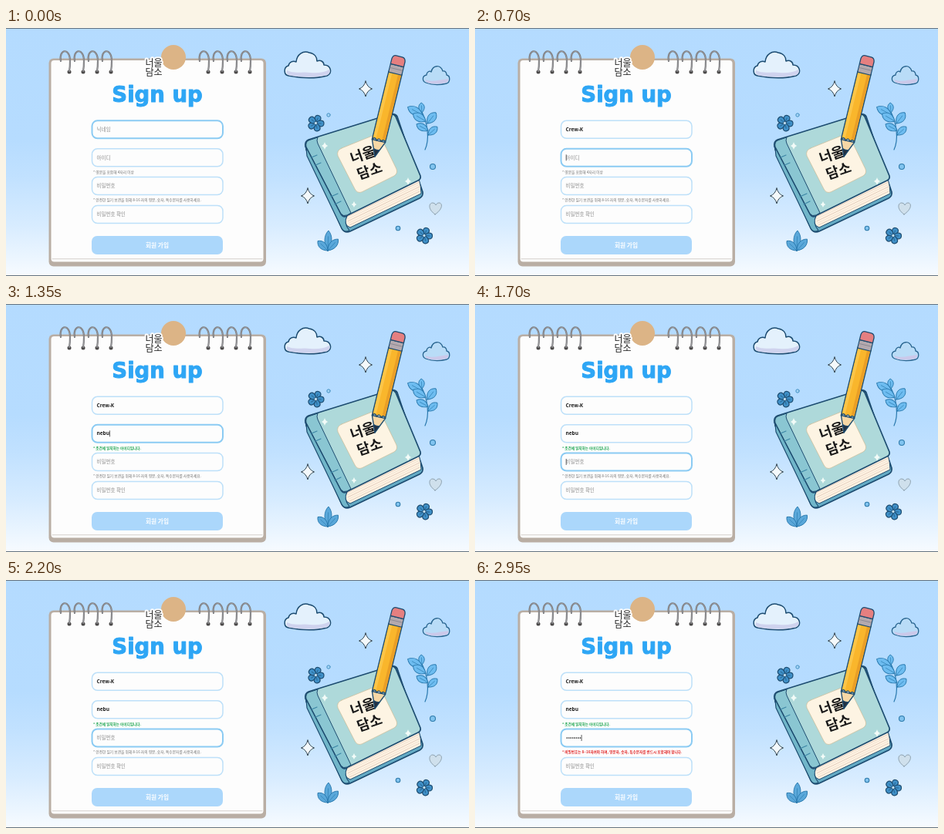
An HTML page with a canvas for the animation above (3 s loop, 600x322 px).

```html
<!DOCTYPE html>
<html lang="ko">
<head>
<meta charset="utf-8">
<title>Sign up</title>
<style>
html, body { margin: 0; width: 100%; height: 100%; overflow: hidden; background: #b6dcff; }
canvas { display: block; width: 600px; height: 322px; }
</style>
</head>
<body>
<canvas id="stage"></canvas>
<script>
const W = 600, H = 322, LOOP = 3000;
const KR = '"Noto Sans CJK KR", "Noto Sans", sans-serif';
const LATIN = '"Noto Sans", "Open Sans", sans-serif';
const INK = '#1d4c70';
const canvas = document.getElementById('stage');
const dpr = window.devicePixelRatio || 1;

function makeLayer(c) {
  c.width = W * dpr;
  c.height = H * dpr;
  const g = c.getContext('2d');
  g.scale(dpr, dpr);
  g.lineJoin = g.lineCap = 'round';
  g.textBaseline = 'middle';
  return g;
}
const screen = makeLayer(canvas);
const backdrop = document.createElement('canvas');
let g = makeLayer(backdrop);

// ---- helpers
function paint(path, fill, stroke, width = 1) {
  if (fill) { g.fillStyle = fill; g.fill(path); }
  if (stroke) { g.strokeStyle = stroke; g.lineWidth = width; g.stroke(path); }
}
const shape = (d, fill, stroke, width) => paint(new Path2D(d), fill, stroke, width);

function box(x, y, w, h, r, fill, stroke, width) {
  const p = new Path2D();
  p.roundRect(x, y, w, h, r);
  paint(p, fill, stroke, width);
}
function dot(x, y, r, fill, stroke, width) {
  const p = new Path2D();
  p.arc(x, y, r, 0, Math.PI * 2);
  paint(p, fill, stroke, width);
}
function label(s, x, y, size, color, weight = 400, family = KR, align = 'left') {
  g.font = `${weight} ${size}px ${family}`;
  g.textAlign = align;
  g.fillStyle = color;
  g.fillText(s, x, y);
  return g.measureText(s).width;
}
function at(x, y, deg, draw) {
  g.save();
  g.translate(x, y);
  g.rotate(deg * Math.PI / 180);
  draw();
  g.restore();
}

// ---- illustration
function sparkle(x, y, r, fill, stroke) {
  const k = r * 0.2;
  at(x, y, 0, () => shape(
    `M0 ${-r}Q${k} ${-k} ${r * .85} 0Q${k} ${k} 0 ${r}Q${-k} ${k} ${-r * .85} 0Q${-k} ${-k} 0 ${-r}Z`,
    fill, stroke, 1));
}
function flower(x, y, r) {
  for (let i = 0; i < 5; i++) {
    at(x, y, i * 72 + 22, () => {
      shape(`M0 0C${-r * .5} ${-r * .35} ${-r * .5} ${-r} 0 ${-r}C${r * .5} ${-r} ${r * .5} ${-r * .35} 0 0Z`, '#3f90c8', INK, 1.2);
      shape(`M0 ${-r * .3}V${-r * .65}`, null, INK, .6);
    });
  }
  dot(x, y, r * .2, '#c4e2f4', INK, .8);
}
function leaf(x, y, deg, len, wide, fill = '#6dbcf0') {
  at(x, y, deg, () => {
    shape(`M0 0C${-wide} ${-len * .35} ${-wide} ${-len * .75} 0 ${-len}C${wide} ${-len * .75} ${wide} ${-len * .35} 0 0Z`, fill, '#2878ad', .9);
    shape(`M0 0V${-len * .7}`, null, '#2878ad', .6);
  });
}
function clouds() {
  shape('M366 62C360 61 359 51 366 49C367 44 372 42 376 44C377 34 385 29 393 32C400 33 403 38 403 43C408 41 412 44 412 48C421 48 424 59 416 62C401 66 381 65 366 62Z', '#e4f1fc', INK, 1.5);
  shape('M364 55C374 60 385 56 394 58C403 59 412 58 419 54C420 58 419 60 415 61.500C401 65 381 64 367 61.500C364 60 363 58 364 55Z', '#cfd3ee');
  shape('M544 71C539 69 539 62 545 61C545 57 549 55 551 57C553 48 563 47 566 56C569 55 571 58 571 61C576 62 576 70 571 72C563 74 552 74 544 71Z', '#b9dcf7', '#28648f', 1.3);
  shape('M543 67C553 71 562 67 573 66Q574 70 570 71.300C561 73 551 73 545 70.500Z', '#cbc9ea');
}
function sprigs() {
  shape('M543 158C549 145 547 124 538 107', null, '#2878ad', 1.2);
  leaf(539, 110, -4, 13, 5);
  leaf(540, 113, -62, 22, 7);
  leaf(544, 121, -60, 19, 7);
  leaf(546, 124, 38, 18, 7);
  leaf(547, 133, -62, 17, 6);
  leaf(547, 139, 48, 16, 6);
  leaf(417, 289, 2, 26, 6, '#5aa8da');
  leaf(417, 289, -46, 18, 6, '#5aa8da');
  leaf(417, 289, 42, 20, 6, '#5aa8da');
}
function book() {
  // back cover, page block, front cover, spine
  shape('M390 149L500 112Q505 111 507 115L540 213Q541 218 536 221L446 264Q439 267 435 260L389 158Z', '#64abc5', INK, 1.7);
  shape('M437 242L535 196Q538 206 538 215L446 259Q437 256 437 242Z', '#fff3e3', INK, 1);
  for (let i = 1; i < 6; i++) {
    shape(`M${440 + i} ${243 + i * 2.6}L${536} ${197 + i * 3}`, null, i % 2 ? '#dcc4b4' : '#eedfce', .8);
  }
  shape('M392 145L498 112Q503 111 505 115L537 192Q538 196 534 198L443 243Q437 246 434 241L388 154Q387 147 392 145Z', '#aed9da', INK, 1.7);
  shape('M392 146L404 142Q402 146 404 150L447 240L442 243Q437 245 434 241L389 154Q388 148 392 146Z', '#8ac6d2', INK, 1);
  shape('M389 155L434 242Q437 247 442 244Q437 253 445 263Q438 266 435 260L390 166Z', '#71b6c9', INK, 1.2);
  shape('M396 168L403 165M401 178L408 175M421 219L430 215M426 229L434 225', null, '#3c86a5', 1.2);
  shape('M435 156L477 139Q483 137 486 142L506 183Q508 189 503 192L461 213Q455 215 452 209L430 166Q428 159 435 156Z', '#fdf4e3', '#cbbf9f', .8);
  at(462, 164, -19, () => label('너울', 0, 0, 18, '#191919', 600, KR, 'center'));
  at(471, 185, -19, () => label('담소', 0, 0, 18, '#191919', 600, KR, 'center'));
  sparkle(413, 153, 5, '#f2fbf8');
  sparkle(521, 199, 5, '#f2fbf8');
  sparkle(451, 229, 4, '#f2fbf8');
}
function pencil() {
  at(478, 167, 13.7, () => {
    shape('M0 0L-8.800 -21H8.800Z', '#f6d7a5', INK, 1.4);
    shape('M0 0L-4 -10Q0 -8 4 -10Z', '#233142', INK, 1);
    shape('M-8.800 -21V-112H8.800V-21Q6 -26 3 -21Q0 -26 -3 -21Q-6 -26 -8.800 -21Z', '#f9b62c', INK, 1.4);
    shape('M-8 -25V-111H-4V-24Z', '#fcc548');
    shape('M4 -24V-111H8.100V-25Z', '#ea9f26');
    box(-8.800, -122, 17.600, 11, 1, '#b4a9ae', INK, 1.2);
    shape('M-8 -117H8', null, '#85838f', .8);
    shape('M-8.800 -122V-129Q-8 -134 -4 -134H4Q8 -134 8.800 -129V-122Z', '#e57f80', INK, 1.3);
  });
}
function decorations() {
  clouds();
  sprigs();
  sparkle(466, 79, 10, '#f4f9fb', '#32444f');
  sparkle(391, 218, 10, '#f4f9fb', '#32444f');
  flower(401.500, 123.500, 10.500);
  flower(542, 269.500, 10.500);
  dot(418, 113, 2.2, '#a5d5f7', '#3a8abb', .9);
  dot(553, 180, 3.5, '#80c3ef', '#2f7bab', 1.1);
  dot(508, 260, 2.8, '#80c3ef', '#2f7bab', 1.1);
  shape('M556 242C546 235 548 227 553 227Q556 227 557 230Q559 226 562 227C567 229 564 237 556 242Z', '#cfe0ec', '#8fa3b1', 1);
}

// ---- notebook
function ring(x) {
  dot(x, 57, 2.500, '#4c4a4a');
  const d = `M${x - 11} 43C${x - 14} 27 ${x + 1} 25 ${x + 1} 43Q${x + 1} 51 ${x} 56`;
  shape(d, null, '#77777a', 2.2);
  shape(d, null, '#a5a5a8', .8);
}
function notebook() {
  box(55.500, 39.500, 281.500, 270, 6, '#b9aea4');
  box(58.500, 42, 275, 261.500, 4, '#fdfdfd');
  shape('M60 299.800H332', null, '#d3cfcb', 1);
  for (let i = 0; i < 4; i++) {
    ring(82 + i * 18);
    ring(262 + i * 18);
  }
  dot(217, 38, 16, '#dcb486');
  const lines = ['너울', '담소'];
  g.font = `500 12px ${KR}`;
  g.textAlign = 'center';
  g.strokeStyle = '#fdfdfd';
  g.lineWidth = 4;
  lines.forEach((s, i) => g.strokeText(s, 191.500, 45 + i * 12));
  lines.forEach((s, i) => label(s, 191.500, 45 + i * 12, 12, '#222', 500, KR, 'center'));

  g.textBaseline = 'alphabetic';
  label('Sign up', 196, 96, 27.500, '#2ea6f5', 700, '"DejaVu Sans", Inter, sans-serif', 'center');
  g.strokeStyle = '#2ea6f5';
  g.lineWidth = 1;
  g.strokeText('Sign up', 196, 96);
  g.textBaseline = 'middle';

  box(111, 270, 170, 24, 7, '#abd7fb');
  label('회원 가입', 196, 282, 7.700, '#fff', 700, KR, 'center');
}
function drawBackdrop() {
  const sky = g.createLinearGradient(0, 0, 0, H);
  sky.addColorStop(0, '#b4dbff');
  sky.addColorStop(.45, '#b6dcff');
  sky.addColorStop(.6, '#c1e1ff');
  sky.addColorStop(.8, '#d8ecff');
  sky.addColorStop(1, '#f7fbff');
  g.fillStyle = sky;
  g.fillRect(0, 0, W, H);
  g.fillStyle = '#65737f';
  g.fillRect(0, 0, W, 1);
  g.fillRect(0, H - 1, W, 1);
  decorations();
  book();
  pencil();
  notebook();
}

// ---- form
const GRAY = '#6f6f6f', RED = '#e02424', GREEN = '#16a34a';
const hints = {
  id: ['* 영문을 포함해 4자리 이상', GRAY, 400],
  idBad: ['* 아이디는 4글자 이상이며 영문과 숫자로만 이루어져야 합니다.', RED, 600],
  idGood: ['* 조건에 일치하는 아이디입니다.', GREEN, 600],
  pw: ['* 안전한 일기 보관을 위해 8-16 자의 영문, 숫자, 특수문자를 사용하세요.', GRAY, 400],
  pwBad: ['* 비밀번호는 8~16자여야 하며, 영문자, 숫자, 특수문자를 반드시 포함해야 합니다.', RED, 600]
};
function hint(key, y) {
  const [s, color, weight] = hints[key];
  label(s, 113, y, weight > 400 ? 4.6 : 4.75, color, weight);
}
const typed = (t, start, step, max) =>
  Math.max(0, Math.min(max, Math.floor((t - start) / step) + 1));

function field(y, placeholder, value, focus, caret, masked) {
  box(111.500, y + .5, 169.500, 23, 7, '#fdfdfd', focus ? '#8bcbf3' : '#bde0f9', focus ? 2 : 1.5);
  const mid = y + 12;
  let end = 117.500;
  if (!value) label(placeholder, 117.500, mid, 6.500, '#8c8c8c');
  else if (masked) {
    for (let i = 0; i < value.length; i++) dot(119.300 + i * 2.450, mid, .85, '#222');
    end += value.length * 2.450 + .3;
  } else end += label(value, 117.500, mid, 6.500, '#222', 600, LATIN);
  if (caret) {
    g.fillStyle = '#222';
    g.fillRect(end + .3, mid - 4, .7, 8);
  }
}
function drawForm(t) {
  const focus = t < 700 ? 0 : t < 1450 ? 1 : 2;
  const nick = 'Crew-K'.slice(0, typed(t, 50, 65, 6));
  const id = 'nebu'.slice(0, typed(t, 950, 100, 4));
  const pw = '*'.repeat(typed(t, 2250, 100, 8));
  const caret = t >= 50 && !(t >= 1950 && t < 2250);
  field(119.800, '닉네임', nick, focus === 0, caret && focus === 0);
  field(156.300, '아이디', id, focus === 1, caret && focus === 1);
  field(193, '비밀번호', pw, focus === 2, caret && focus === 2, true);
  field(230, '비밀번호 확인', '', false, false);
  hint(id.length === 4 ? 'idGood' : id ? 'idBad' : 'id', 187);
  hint(pw ? 'pwBad' : 'pw', 223);
}

drawBackdrop();
g = screen;
function frame() {
  g.drawImage(backdrop, 0, 0, W, H);
  drawForm(performance.now() % LOOP);
  requestAnimationFrame(frame);
}
frame();
</script>
</body>
</html>
```
